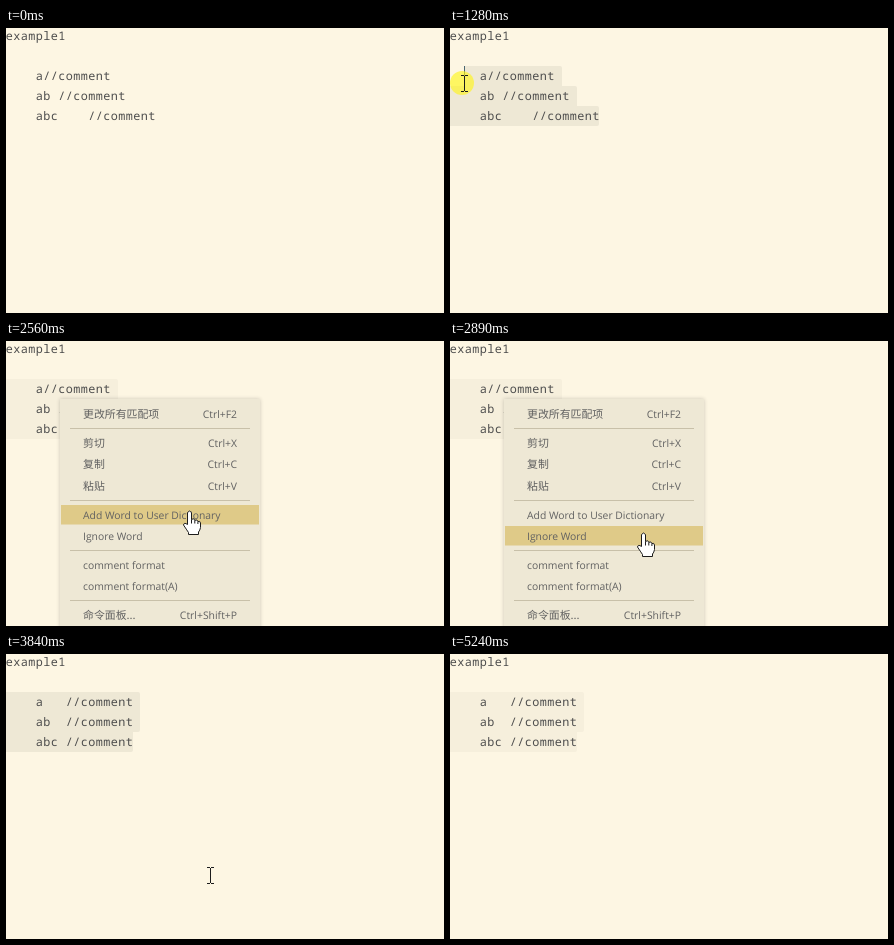
Recreate the animation shown at these times as an HTML page with a canvas. Size 438x285 px, loop 5.3 s.

```html
<!DOCTYPE html>
<html lang="en">
<head>
<meta charset="utf-8">
<title>Comment alignment</title>
<style>
html, body { margin: 0; width: 100%; height: 100%; overflow: hidden; background: #fdf6e3; }
canvas { display: block; }
</style>
</head>
<body>
<canvas id="stage" width="438" height="285"></canvas>
<script>
const ctx = document.getElementById('stage').getContext('2d');
const LOOP = 5300, COL = 7.5, ROW = 20, TOP = 38, LEFT = -0.5;
const CODE = '11.8px "Noto Sans Mono", "DejaVu Sans Mono", monospace';
const UI = '"Open Sans", "Noto Sans", "Noto Sans CJK SC", sans-serif';
const HAN = '"Noto Sans CJK SC", "Noto Sans CJK", sans-serif';

ctx.textRendering = 'geometricPrecision';
ctx.font = CODE;
const tracking = COL - ctx.measureText('a').width;

const ragged = ['    a//comment', '    ab //comment', '    abc    //comment'];
const aligned = ['    a   //comment', '    ab  //comment', '    abc //comment'];

// label, shortcut, vertical centre
const items = [
  ['更改所有匹配项', 'Ctrl+F2', 73],
  ['剪切', 'Ctrl+X', 102],
  ['复制', 'Ctrl+C', 123],
  ['粘贴', 'Ctrl+V', 145],
  ['Add Word to User Dictionary', '', 174],
  ['Ignore Word', '', 195],
  ['comment format', '', 224],
  ['comment format(A)', '', 245],
  ['命令面板...', 'Ctrl+Shift+P', 274]
];

// pointer moves: first step, last step, number of steps, end x, end y
const moves = [
  [110, 600, 8, 158, 93],
  [670, 1140, 8, 46, 56],
  [1210, 1280, 2, 14, 55],
  [1350, 1420, 2, 3, 55],
  [1750, 2020, 5, 56, 57],
  [2290, 2560, 5, 183, 169],
  [2630, 2690, 2, 188, 176],
  [2820, 3170, 6, 204, 221],
  [4640, 4910, 5, 396, 296]
];

const during = (t, a, b) => t >= a && t < b;

function pointerAt(t) {
  let x = 396, y = 285;
  for (const [start, end, n, toX, toY] of moves) {
    if (t < start) break;
    const step = Math.floor((t - start) / (end - start) * (n - 1) + 0.01) + 1;
    const p = Math.min(1, step / n);
    x += (toX - x) * p;
    y += (toY - y) * p;
  }
  return { x, y };
}

function text(str, x, y, font, color, align = 'left') {
  ctx.font = font;
  ctx.fillStyle = color;
  ctx.textAlign = align;
  ctx.fillText(str, x, y);
}

function code(str, y) {
  ctx.letterSpacing = tracking + 'px';
  text(str, LEFT + tracking / 2, y, CODE, '#4d4d4d');
  ctx.letterSpacing = '0px';
}

function selection(lines, row, col, color) {
  const right = i => i < row || i > 2 ? 0
    : Math.floor(LEFT + (lines[i].length + (i < 2 ? 1 : 0)) * COL);
  ctx.fillStyle = color;
  for (let i = row; i < 3; i++) {
    const x = i === row ? Math.max(0, Math.floor(LEFT + col * COL)) : 0;
    const w = right(i) - x;
    if (w <= 0) continue;
    ctx.beginPath();
    ctx.roundRect(x, TOP + i * ROW, w, ROW,
      [0, right(i - 1) < right(i) ? 2 : 0, right(i + 1) < right(i) ? 2 : 0, 0]);
    ctx.fill();
  }
}

function editor(t, pos) {
  const lines = t < 3840 ? ragged : aligned;
  const dragging = during(t, 670, 1420);
  if (t >= 670) {
    let row = 0, col = 0;
    if (dragging) {
      row = Math.max(0, Math.min(2, Math.floor((pos.y - TOP) / ROW)));
      col = Math.min(lines[row].length, Math.round(pos.x / COL));
    }
    const faded = during(t, 2020, 3840) || t >= 5240;
    selection(lines, row, col, faded ? '#f6efdc' : '#eee8d5');
    if (dragging) {
      ctx.fillStyle = '#4a6670';
      ctx.fillRect(Math.floor(LEFT + col * COL), TOP + row * ROW, 1, ROW);
    }
  }
  code('example1', 12);
  lines.forEach((s, i) => code(s, 52 + i * ROW));
}

function menu(hover) {
  ctx.save();
  ctx.shadowColor = 'rgba(0,0,0,.2)';
  ctx.shadowBlur = 4;
  ctx.fillStyle = '#eee8d5';
  ctx.fillRect(54, 58, 200, 240);
  ctx.restore();
  if (hover) {
    ctx.fillStyle = '#dfca88';
    ctx.fillRect(55, hover[2] - 10, 198, 19.5);
  }
  ctx.fillStyle = '#c8c0a9';
  for (const y of [87, 159, 209, 259]) ctx.fillRect(64, y, 180, 1);
  for (const [label, keys, y] of items) {
    const han = label > '~';
    text(label, 77, y + 4, han ? '10.9px ' + HAN : '10.35px ' + UI, '#616161');
    text(keys, 231, y + 4, '10.4px ' + UI, '#616161', 'right');
  }
}

const arrow = new Path2D('M0 0V16.5L4 13L6.5 18.8L9 17.7L6.6 12H11.8Z');
const hand = new Path2D('M-2 2Q0 -1 2 2V9Q4.5 7 5.3 9.8Q7.8 8.5 8.4 11' +
  'Q10.6 10 11 12.5V17Q10.5 20 9 21.5V24H-1V22Q-3 19 -6 14.5Q-5.5 11.5 -2 14Z' +
  'M2 9V13M5.3 9.8V13M8.4 11V13.5');
const beam = new Path2D('M-3.5 -8H-.5M.5 -8H3.5M0 -7.5V7.5M-3.5 8H-.5M.5 8H3.5');

function pointer(pos, shape) {
  ctx.save();
  ctx.translate(Math.round(pos.x) + 0.5, Math.round(pos.y) + 0.5);
  ctx.strokeStyle = '#1c1c1c';
  ctx.fillStyle = '#fff';
  ctx.lineJoin = 'round';
  if (shape !== beam) ctx.fill(shape);
  ctx.stroke(shape);
  ctx.restore();
}

function draw(t) {
  const pos = pointerAt(t);
  const open = during(t, 2170, 3840);
  const hover = open && items.find(i => Math.abs(pos.y - i[2]) <= 10);
  ctx.fillStyle = '#fdf6e3';
  ctx.fillRect(0, 0, 438, 285);
  editor(t, pos);
  if (open) menu(hover);
  if (during(t, 670, 1420) || during(t, 2020, 2170) || during(t, 3700, 3840)) {
    ctx.fillStyle = 'rgba(255,246,20,.62)';
    ctx.beginPath();
    ctx.arc(pos.x - 2, pos.y, 12, 0, 7);
    ctx.fill();
  }
  if (during(t, 110, 4910)) pointer(pos, !open ? beam : hover ? hand : arrow);
}

const begin = performance.now();
function frame() {
  draw((performance.now() - begin) % LOOP);
  requestAnimationFrame(frame);
}
frame();
</script>
</body>
</html>
```
